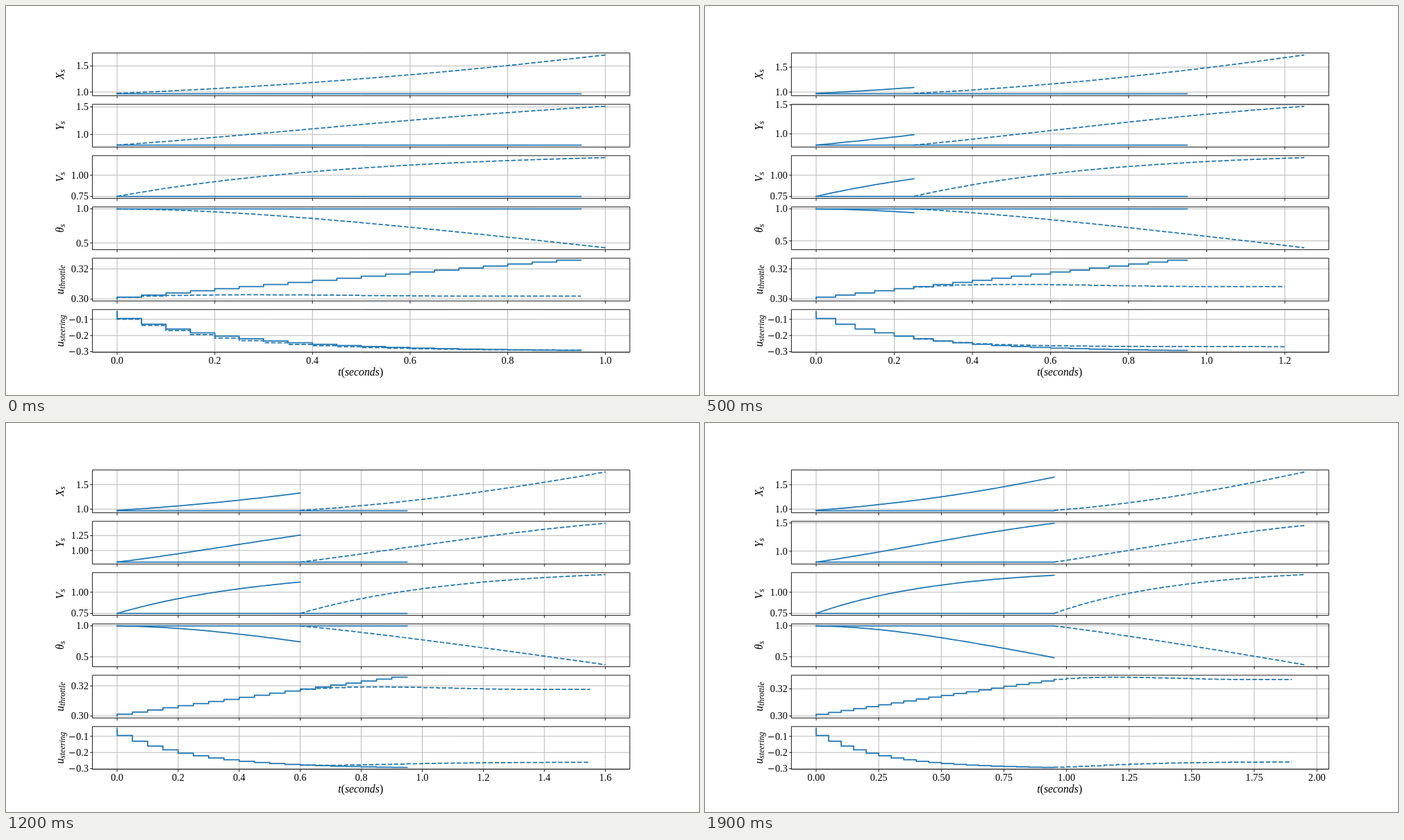
Recreate the animation shown at these times as an HTML page with a canvas. Size 998 by 561 pixels, loop 2 s.

```html
<!DOCTYPE html>
<html lang="en">
<head>
<meta charset="utf-8">
<title>Predicted and driven trajectory</title>
<style>
  html, body { margin: 0; width: 100%; height: 100%; overflow: hidden; background: #fff; }
  canvas { display: block; width: 998px; height: 561px; }
</style>
</head>
<body>
<canvas id="stage" width="998" height="561"></canvas>
<script>
const ctx = document.getElementById('stage').getContext('2d');
const STEPS = 20, STEP_MS = 100, DT = 0.05;
const LEFT = 124.9, RIGHT = 898.3, TOP = 67.8, HEIGHT = 61.6, PITCH = 74;
const BLUE = '#1f77b4', SERIF = '"Liberation Serif", "Noto Serif", serif';
const TICK_FONT = `14.3px ${SERIF}`, MINUS_FONT = '13px "DejaVu Sans", sans-serif';
const START = { x: 0.974, y: 0.806, v: 0.75, th: 1 };
const REST = { ...START, x: 0.966 };

const indices = n => Array.from({ length: n }, (_, i) => i);
const smooth = p => { p = Math.min(1, Math.max(0, p)); return p * p * (3 - 2 * p); };

// Applied controls
const throttle = j => j ? 0.3012 + 0.00144 * (j - 1) - 0.0000042 * (j - 1) ** 2 : 0.3;
const steering = j => -0.298 + 0.203 * 0.825 ** (j - 1);

// Controls planned at step k, i intervals ahead
function plannedThrottle(k, i) {
  const settle = 0.0011 + 0.0008 * Math.exp(-k / 4);
  return throttle(k) + 0.0031 * (1 - 0.62 ** i) - (0.0031 - settle) * smooth((i - 4) / 12);
}
function plannedSteering(k, i) {
  const settle = -0.257 - 0.036 * Math.exp(-k / 4.5);
  const gap = steering(k) - settle;
  const drift = Math.max(-0.0105, -0.0092 + 0.11 * gap);
  return settle + (gap + drift * i) * 0.75 ** i;
}

// Kinematic car model driven by a steering sequence
function drive(steer, intervals, t0) {
  const sub = 4, h = DT / sub;
  let { x, y, th } = START;
  const path = [{ t: t0, ...START }];
  const speed = t => START.v + 0.531 * (1 - Math.exp(-1.98 * t));
  for (let n = 0; n < intervals * sub; n++) {
    const v = speed((n + 0.5) * h);
    const turn = 2.18 * v * Math.tan(steer(Math.floor(n / sub))) * h;
    const mid = th + turn / 2;
    x += 0.977 * v * Math.cos(mid) * h;
    y += v * Math.sin(mid) * h;
    th += turn;
    path.push({ t: t0 + (n + 1) * h, x, y, v: speed((n + 1) * h), th });
  }
  return path;
}

// Staircase where each value fills the interval before it
function stairs(value, t0) {
  const pts = [[t0, value(0)]];
  for (let i = 1; i < STEPS; i++)
    pts.push([t0 + (i - 1) * DT, value(i)], [t0 + i * DT, value(i)]);
  return pts;
}

function buildPanels(k) {
  const t0 = k * DT;
  const plan = drive(i => plannedSteering(k, i), STEPS, t0);
  const driven = drive(steering, k, 0);
  const pick = (path, key) => path.map(p => [p.t, p[key]]);
  const state = (name, key, tick) => ({
    name, sub: 's', tick,
    solid: [[[0, REST[key]], [0.95, REST[key]]], pick(driven, key)],
    dashed: pick(plan, key)
  });
  const control = (sub, tick, applied, planned) => ({
    name: 'u', sub, tick,
    solid: [stairs(applied, 0)],
    dashed: stairs(i => planned(k, i), t0)
  });
  return [
    state('X', 'x', 0.5),
    state('Y', 'y', k > 8 && k < 19 ? 0.25 : 0.5),
    state('V', 'v', 0.25),
    state('θ', 'th', 0.5),
    control('throttle', 0.02, throttle, plannedThrottle),
    control('steering', 0.1, steering, plannedSteering)
  ];
}

function ticksIn(lo, hi, step) {
  const first = Math.ceil(lo / step - 0.01), last = Math.floor(hi / step + 0.01);
  return indices(last - first + 1).map(i => (first + i) * step);
}
const decimals = step => (step === 0.5 || step === 0.2 || step === 0.1 ? 1 : 2);
const label = (value, step) => Math.abs(value).toFixed(decimals(step));

function segment(x1, y1, x2, y2) {
  ctx.beginPath();
  ctx.moveTo(x1, y1);
  ctx.lineTo(x2, y2);
  ctx.stroke();
}
function text(str, x, y, align, font) {
  ctx.font = font;
  ctx.textAlign = align;
  ctx.fillText(str, x, y);
}
// Centres a run of [string, font, drop] pieces
function run(pieces, cx, y) {
  const widths = pieces.map(([str, font]) => {
    ctx.font = font;
    return ctx.measureText(str).width;
  });
  let x = cx - widths.reduce((a, b) => a + b) / 2;
  pieces.forEach(([str, font, drop = 0], i) => {
    text(str, x, y + drop, 'left', font);
    x += widths[i];
  });
}

function axisName({ name, sub }, y) {
  ctx.save();
  ctx.translate(83, y);
  ctx.rotate(-Math.PI / 2);
  run([[name, `italic 15.8px ${SERIF}`], [sub, `italic 11.8px ${SERIF}`, 2.4]], 0, 0);
  ctx.restore();
}

function drawPanel(panel, top, px, xTicks) {
  const bottom = top + HEIGHT, margin = HEIGHT / 22;
  const values = [...panel.solid, panel.dashed].flat().map(p => p[1]);
  const lo = Math.min(...values), hi = Math.max(...values);
  const scale = (HEIGHT - 2 * margin) / (hi - lo);
  const py = v => bottom - margin - (v - lo) * scale;
  const pad = margin / scale;
  const yTicks = ticksIn(lo - pad, hi + pad, panel.tick);

  ctx.lineWidth = 0.9;
  ctx.lineCap = 'butt';
  for (const t of xTicks) {
    const x = px(t);
    ctx.strokeStyle = '#b0b0b0';
    segment(x, top, x, bottom);
    ctx.strokeStyle = '#000';
    segment(x, bottom, x, bottom + 3.7);
  }
  for (const v of yTicks) {
    const y = py(v), str = label(v, panel.tick);
    ctx.strokeStyle = '#b0b0b0';
    segment(LEFT, y, RIGHT, y);
    ctx.strokeStyle = '#000';
    segment(LEFT - 3.7, y, LEFT, y);
    text(str, 118.8, y + 4.8, 'right', TICK_FONT);
    if (v < 0) text('−', 118.8 - ctx.measureText(str).width, y + 4.8, 'right', MINUS_FONT);
  }

  const curve = pts => {
    ctx.beginPath();
    for (const [t, v] of pts) ctx.lineTo(px(t), py(v));
    ctx.stroke();
  };
  ctx.strokeStyle = BLUE;
  ctx.lineWidth = 1.75;
  ctx.lineJoin = 'round';
  ctx.setLineDash([6.4, 2.8]);
  curve(panel.dashed);
  ctx.setLineDash([]);
  ctx.lineCap = 'square';
  panel.solid.forEach(curve);

  ctx.strokeStyle = '#000';
  ctx.lineWidth = 0.9;
  ctx.strokeRect(LEFT, top, RIGHT - LEFT, HEIGHT);
  axisName(panel, top + HEIGHT / 2);
}

function draw(k) {
  const span = 1 + k * DT, margin = (RIGHT - LEFT) / 22;
  const px = t => LEFT + margin + t / span * (RIGHT - LEFT - 2 * margin);
  const step = k < 13 ? 0.2 : 0.25;
  const xTicks = ticksIn(0, span * 1.05 - step * 0.01, step);
  const italic = `italic 15.8px ${SERIF}`, upright = `15.8px ${SERIF}`;

  ctx.fillStyle = '#fff';
  ctx.fillRect(0, 0, 998, 561);
  ctx.fillStyle = '#000';
  buildPanels(k).forEach((p, i) => drawPanel(p, TOP + i * PITCH, px, xTicks));
  for (const t of xTicks)
    text(label(t, step), px(t), 515.8, 'center', TICK_FONT);
  run([['t', italic], ['(', upright], ['seconds', italic], [')', upright]], 510.7, 533.3);
}

let shown = -1;
function tick() {
  const k = Math.floor(performance.now() / STEP_MS) % STEPS;
  if (k !== shown) draw(shown = k);
  requestAnimationFrame(tick);
}
tick();
</script>
</body>
</html>
```
